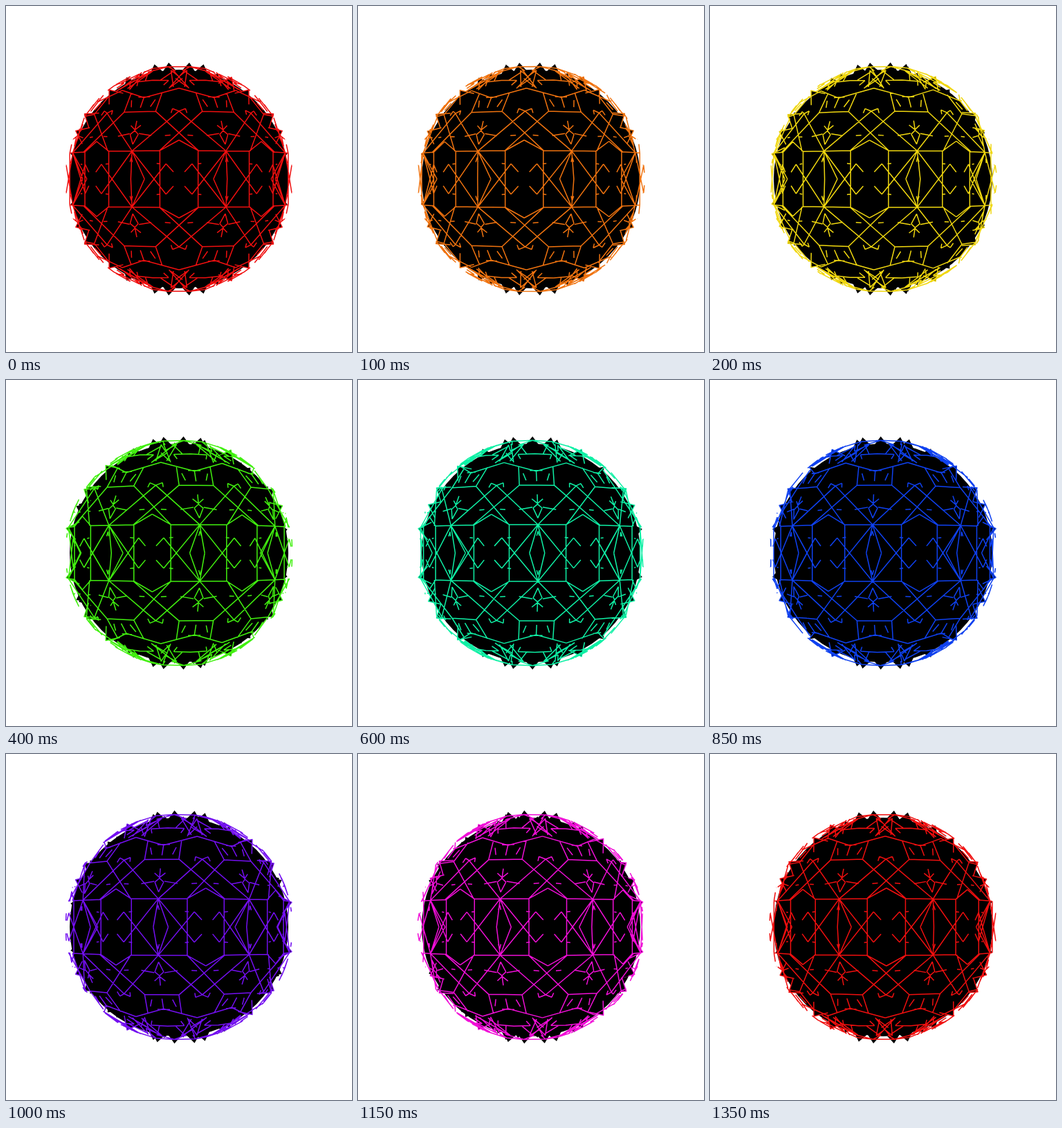
Animation, 500 px wide and 500 px high, one loop 1.4 s. Source, as an HTML page with a canvas:

```html
<!DOCTYPE html>
<html lang="en">
<head>
<meta charset="utf-8">
<title>Spinning ball</title>
<style>
  html, body { margin: 0; width: 100%; height: 100%; overflow: hidden; background: #fff; }
  canvas { display: block; width: 500px; height: 500px; }
</style>
</head>
<body>
<canvas id="stage" width="500" height="500"></canvas>
<script>
const ctx = document.getElementById('stage').getContext('2d');
const STEPS = 28, STEP_MS = 50;
const SIDES = 8, SECTOR = 360 / SIDES, GAP = SECTOR / 2;
const RADIUS = 163, EYE = 1400, RAD = Math.PI / 180;

// A point is [longitude from the spindle axis, height, optional ring radius].
const hub = [0, 36.3], corner = [13.5, 36.5, 157], roof = [GAP, 50];
const shoulder = [9.6, 88.5], box = [11.4, 115], dip = [0, 108], peak = [GAP, 121];
const notch = [GAP, 88.5], barb = [16.6, 19.5], rim = [0, 158, 40];

// Each path is mirrored left-right and up-down in every sector.
const paths = [
  [hub, [4, 0, 142]],
  [[0, 28], [0.6, 22]],
  [hub, corner],
  [corner, [13.5, 0, 157]],
  [corner, roof],
  [[0, -36.3], barb, [20, 9]],
  [[12.3, 20], [14, 19.5]],
  [hub, notch],
  [[GAP + 4.3, 86], [GAP + 3.6, 92], notch],
  [shoulder, [31.5, 36.5]],
  [shoulder, [0, 88.5, 135]],
  [shoulder, box],
  [[0, 76], [0, 63], [2.2, 58], [0, 45]],
  [[2.8, 70], [0, 64]],
  [[2.5, 59], [9, 56]],
  [[15.7, 56], [18.4, 56.5]],
  [dip, peak],
  [dip, [0, 94]],
  [[0, 109], [4, 109]],
  [[8, 105], [6, 95]],
  [[GAP - 7, 121], [GAP + 9, 152]],
  [[GAP - 4, 123], [GAP - 10, 150], [GAP, 139]],
  [[GAP - 6, 123], [GAP + 3, 136]],
  [[0, 134], [14, 133], [11, 126]],
  [[7, 134], [15, 147]],
  [rim, [SECTOR, 158, 40]],
  [rim, [GAP - 4, 149]]
];

const spikes = [
  [0, 35, 162], [11, 68, 149], [-11, 68, 149], [9.6, 92, 137], [-9.6, 92, 137],
  [0, 125, 106], [GAP, 147, 76], [0, 164, 38]
];

function project([lon, y, r = Math.sqrt(RADIUS * RADIUS - y * y)], turn, mx, my) {
  const a = (turn + mx * lon) * RAD;
  const z = r * Math.cos(a), s = EYE / (EYE - z);
  return { x: r * Math.sin(a) * s, y: -my * y * s, z };
}

function eachSector(k, fn) {
  for (let i = 0; i < SIDES; i++) fn(GAP - SECTOR * k / STEPS + SECTOR * i);
}

function drawSpike(p) {
  const d = Math.hypot(p.x, p.y), ux = p.x / d, uy = p.y / d;
  const bx = p.x * 0.9, by = p.y * 0.9, w = 13;
  ctx.beginPath();
  ctx.moveTo(bx - uy * w, by + ux * w);
  ctx.lineTo(p.x, p.y);
  ctx.lineTo(bx + uy * w, by - ux * w);
  ctx.fill();
  if (p.z > 0 && p.z < 50 && Math.abs(p.y) < 150) ctx.stroke();
}

function drawPath(path, turn, mx, my) {
  const pts = path.map(p => project(p, turn, mx, my));
  for (let i = 1; i < pts.length; i++) {
    const a = pts[i - 1], b = pts[i];
    if (a.z + b.z < 24) continue;
    ctx.moveTo(a.x, a.y);
    ctx.lineTo(b.x, b.y);
  }
}

function draw(k) {
  ctx.setTransform(1, 0, 0, 1, 0, 0);
  ctx.fillStyle = '#fff';
  ctx.fillRect(0, 0, 500, 500);
  ctx.translate(250, 250);
  ctx.fillStyle = '#000';
  ctx.strokeStyle = `hsl(${360 * k / (STEPS - 1)}, 88%, 50%)`;
  ctx.lineWidth = 1.5;
  ctx.lineJoin = 'round';

  ctx.beginPath();
  ctx.arc(0, 0, 158, 0, 2 * Math.PI);
  ctx.fill();
  eachSector(k, turn => {
    for (const s of spikes)
      for (const my of [1, -1]) drawSpike(project(s, turn, 1, my));
  });

  ctx.beginPath();
  eachSector(k, turn => {
    for (const path of paths)
      for (const mx of [1, -1])
        for (const my of [1, -1]) drawPath(path, turn, mx, my);
  });
  ctx.stroke();
}

const start = performance.now();
function tick() {
  draw(Math.floor((performance.now() - start) / STEP_MS) % STEPS);
  requestAnimationFrame(tick);
}
tick();
</script>
</body>
</html>
```
